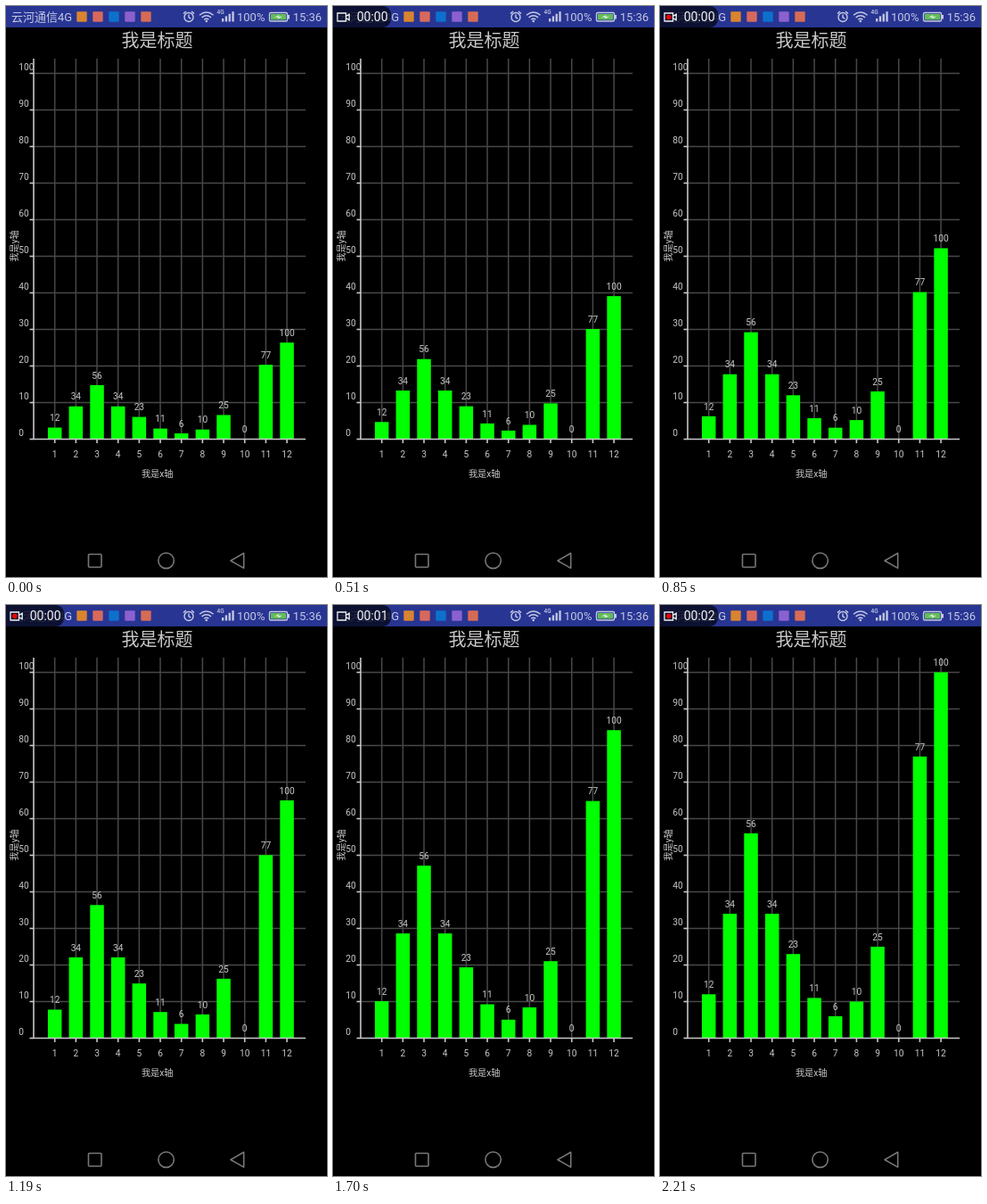
Recreate the animation shown at these times as an HTML page. Size 360 by 640 pixels, loop 2380 ms.

```html
<!DOCTYPE html>
<html lang="zh">
<head>
<meta charset="utf-8">
<title>柱状图</title>
<style>
  html, body { margin: 0; width: 100%; height: 100%; overflow: hidden; background: #000; }
  svg { display: block; width: 360px; height: 640px; }
  text { font-family: Roboto, "Noto Sans CJK SC", "Noto Sans CJK", sans-serif; fill: #c8c8c8; }
  .small { font-size: 10.2px; }
  .mid { text-anchor: middle; }
  .status text { font-size: 13px; fill: #c3c8e2; }
  .line { fill: none; stroke: #c3c8e2; stroke-width: 1.4; }
  .grid { stroke: #484848; stroke-width: 1.5; }
  .axis { stroke: #c8c8c8; stroke-width: 1.6; }
  .nav { fill: none; stroke: #777; stroke-width: 1.6; }
  #bars { fill: #0f0; }
</style>
</head>
<body>
<svg viewBox="0 0 360 640">
  <rect width="360" height="640"/>
  <g class="status">
    <rect width="360" height="24" fill="#283593"/>
    <text x="6" y="17">云河通信4G</text>
    <g id="apps"></g>
    <g class="line">
      <circle cx="205" cy="12.5" r="5"/>
      <path d="M205 9.5v3.3l2.3 1.4M199 8.6l3-2.6M211 8.6l-3-2.6"/>
      <path d="M217 10.2q7.8-6.6 15.6 0M219.6 12.9q5.2-4.4 10.4 0M222.2 15.3q2.6-2.2 5.2 0"/>
    </g>
    <circle cx="224.8" cy="17" r="1.3" fill="#c3c8e2"/>
    <text x="236.5" y="8.6" style="font-size:6.5px;font-weight:500">4G</text>
    <g id="signal" fill="#c3c8e2"></g>
    <text x="259" y="17">100%</text>
    <rect x="295.5" y="7.5" width="20" height="9.5" rx="1.5" class="line" stroke-width="1"/>
    <rect x="297" y="9" width="17" height="6.5" fill="#62bd58"/>
    <rect x="316" y="10" width="2" height="4.5" fill="#c3c8e2"/>
    <path d="M301 12.8l5.5-2.8-.8 2 4.5-.3-5.5 2.9.8-2z" fill="#e8f0e6"/>
    <text x="321.7" y="17">15:36</text>
  </g>

  <g id="recorder">
    <rect x="-8" width="73" height="24" rx="9" fill="#080b20" fill-opacity=".84"/>
    <path d="M5 8h9.5v9H5zM14.5 11.5l3.7-2.4v6.8l-3.7-2.4" fill="none" stroke="#eee" stroke-width="1.3"/>
    <circle id="dot" cx="9.8" cy="12.5" r="2.7" fill="#f00"/>
    <text id="timer" x="26.7" y="17.3" style="font-size:14px;fill:#f2f2f2"></text>
  </g>

  <text x="169.5" y="46" class="mid" style="font-size:20px">我是标题</text>
  <g id="grid" class="grid"></g>
  <g id="bars"></g>
  <g id="axes" class="axis"></g>
  <g id="labels" class="small"></g>
  <text x="169.7" y="528" class="small mid">我是x轴</text>
  <text transform="translate(12.6 269) rotate(-90)" class="small mid">我是y轴</text>

  <g class="nav">
    <rect x="92.5" y="614.5" width="14.5" height="14.5" rx="1"/>
    <circle cx="179.6" cy="621.7" r="8.7"/>
    <path d="M252 621.7l14.7-8.4v16.8z" stroke-linejoin="round"/>
  </g>
</svg>
<script>
const STEP = 170, LOOP = 2380;
const BASE = 485.5, UNIT = 4.1, LEFT = 31, RIGHT = 336, TOP = 59;
const values = [12, 34, 56, 34, 23, 11, 6, 10, 25, 0, 77, 100];
// Share of full height reached at each step, in percent
const growth = [26.4, 29.7, 33, 39.1, 45.6, 52.2, 58.6, 65, 71.3, 77.7, 84.2, 89.6, 95.2, 100];

const $ = id => document.getElementById(id);
function add(parent, tag, attrs, text = "") {
  const node = document.createElementNS("http://www.w3.org/2000/svg", tag);
  for (const key in attrs) node.setAttribute(key, attrs[key]);
  node.textContent = text;
  return $(parent).appendChild(node);
}
const line = (parent, x1, y1, x2, y2) => add(parent, "line", { x1, y1, x2, y2 });

["#d9842f", "#d7695c", "#0d70cd", "#8b60cf", "#d66b55"].forEach((fill, i) =>
  add("apps", "rect", { x: 79.3 + i * 18, y: 6.3, width: 11.4, height: 11.4, rx: 1, fill }));
for (let i = 0; i < 4; i++)
  add("signal", "rect", { x: 242 + i * 3.8, y: 14 - i * 2.6, width: 2.3, height: 3.5 + i * 2.6 });

for (let n = 0; n <= 100; n += 10) {
  const y = BASE - n * UNIT;
  if (n) line("grid", LEFT, y, RIGHT, y);
  line("axes", LEFT - 4.5, y, LEFT, y);
  add("labels", "text", { x: 14.2, y: y - 3.2 }, n);
}
line("axes", LEFT, TOP, LEFT, BASE);
line("axes", LEFT, BASE, RIGHT, BASE);

const columns = values.map((value, i) => {
  const x = 54.7 + i * 23.67;
  line("grid", x, TOP, x, BASE);
  line("axes", x, BASE, x, BASE + 4.5);
  add("labels", "text", { x, y: 505.5, class: "mid" }, i + 1);
  return {
    value,
    bar: add("bars", "rect", { x: x - 7.75, width: 15.5 }),
    label: add("labels", "text", { x, class: "mid" }, value)
  };
});

function draw(now) {
  const time = now % LOOP;
  const scale = growth[Math.floor(time / STEP)] / 100 * UNIT;
  for (const { value, bar, label } of columns) {
    const height = value * scale;
    bar.setAttribute("y", BASE - height);
    bar.setAttribute("height", height);
    label.setAttribute("y", BASE - height - 7.3);
  }
  $("recorder").style.display = time < 340 ? "none" : "";
  $("dot").style.display = (time >= 850 && time < 1360) || time >= 2040 ? "" : "none";
  $("timer").textContent = "00:0" + (time < 1700 ? 0 : time < 2210 ? 1 : 2);
}

const start = performance.now();
function tick() {
  draw(performance.now() - start);
  requestAnimationFrame(tick);
}
tick();
</script>
</body>
</html>
```
